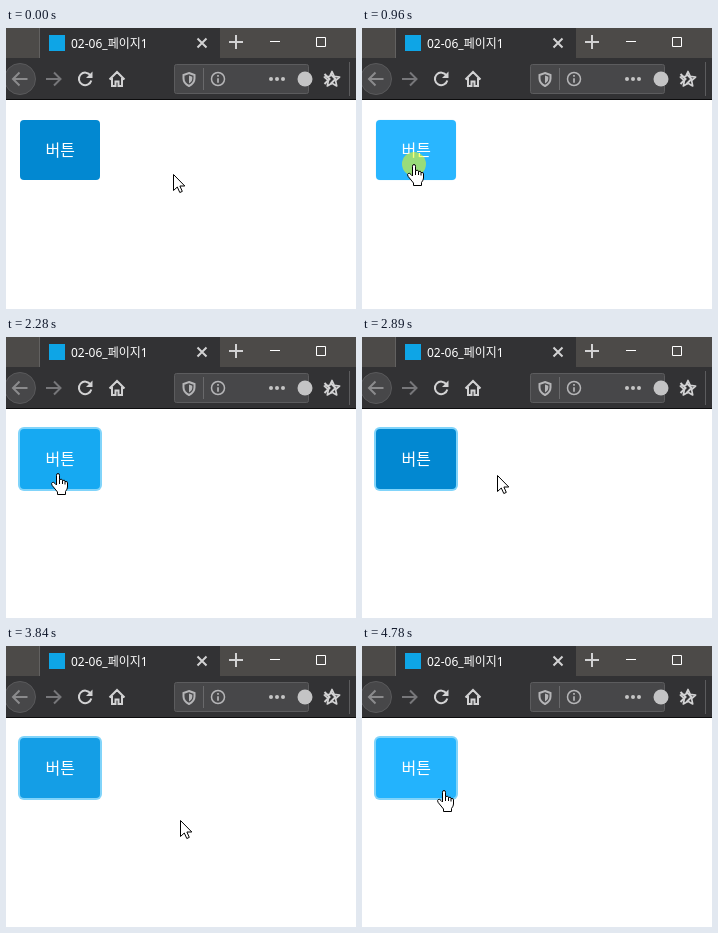
An HTML page for the animation above (5390 ms loop, 350x281 px).

```html
<!DOCTYPE html>
<html lang="ko">
<head>
<meta charset="utf-8">
<title>Button states</title>
<style>
  html, body { margin: 0; width: 100%; height: 100%; overflow: hidden; background: #fff; }
  svg { display: block; width: 100%; height: 100%; }
  text { fill: #fff; font-family: "Noto Sans", "Noto Sans CJK KR", "Noto Sans CJK", sans-serif; }
  .icon { fill: none; stroke: #d2d2d3; stroke-width: 2; }
  .dim { stroke: #77777a; }
  .cursor { fill: #fff; stroke: #000; stroke-linejoin: round; }
</style>
</head>
<body>
<svg viewBox="0 0 350 281">
  <!-- title bar and tab -->
  <rect width="350" height="31" fill="#4c4a48"/>
  <rect y="30" width="350" height="42" fill="#323234"/>
  <rect x="34" width="180" height="31" fill="#323234"/>
  <path d="M33.5 0V30" stroke="#626160"/>
  <rect y="71" width="350" height="1" fill="#0c0c0d"/>
  <rect x="43" y="7" width="16" height="16" fill="#0ea5e6"/>
  <text x="65" y="19.5" font-size="12">02-06_페이지1</text>
  <path class="icon" stroke-width="1.6" d="M191.5 10.500l9 9m0-9l-9 9"/>
  <path class="icon" d="M223 14H237M230 7V21"/>
  <path d="M264 13.500H274M310.500 9.500h9v9h-9z" fill="none" stroke="#fff"/>

  <!-- toolbar -->
  <circle cx="14" cy="51" r="15.500" fill="#474749" stroke="#59595b"/>
  <path class="icon dim" style="stroke:#8b8b8d" d="M21.500 51H7.500M13.500 44.500L7 51l6.500 6.500"/>
  <path class="icon dim" d="M40 51H54M48 44.500L54.500 51L48 57.500"/>
  <path class="icon" d="M84.500 47.500A6.300 6.300 0 1 0 85.300 52.500"/>
  <path d="M86.500 43.500V50H80z" fill="#d2d2d3"/>
  <path class="icon" d="M103.500 51.500L111 44l7.500 7.500M106 50V58H109.500V53.500H112.500V58H116V50"/>

  <!-- address field -->
  <rect x="168.500" y="36.500" width="134" height="29" rx="2" fill="#474749" stroke="#5c5c5e"/>
  <path class="icon" style="stroke:#b5b5b7" d="M183 45l5.500 2v3.500c0 3.500-2.500 6-5.500 7.500c-3-1.500-5.500-4-5.500-7.500V47z"/>
  <path d="M183 47.500l3.300 1.200v2c0 2-1.500 3.500-3.300 4.700z" fill="#b5b5b7"/>
  <path d="M197.500 40V62" stroke="#69696b"/>
  <circle class="icon" style="stroke:#b5b5b7;stroke-width:1.500" cx="212" cy="51" r="6.500"/>
  <path d="M212 47v1.700M212 50.200v4.500" stroke="#b5b5b7" stroke-width="1.700"/>
  <g fill="#c4c4c5">
    <circle cx="265" cy="51" r="2"/><circle cx="271" cy="51" r="2"/><circle cx="277" cy="51" r="2"/>
    <circle cx="299" cy="51" r="7.500"/>
  </g>
  <path id="star" class="icon" style="stroke-width:1.700;stroke-linejoin:round"/>
  <path class="icon" d="M318.500 46l5 5l-5 5M324.500 46l5 5l-5 5"/>
  <path d="M343.500 34V68" stroke="#5c5c5e"/>

  <!-- page -->
  <rect id="ring" fill="#81d4fa"/>
  <rect id="button" x="14" y="92" width="80" height="60" rx="4"/>
  <text x="54.300" y="127.500" font-size="16" text-anchor="middle">버튼</text>
  <circle id="press" r="12" fill="#ffff00" fill-opacity=".52"/>
  <path id="arrow" class="cursor" d="M.5 .5V16.500L4.300 13L6.800 18.500L9.300 17.400L6.900 12H11.800z"/>
  <g id="hand" class="cursor">
    <path d="M5.500 12V2.300Q5.500 .5 7 .5Q8.500 .5 8.500 2.300V6.500Q11.500 5.500 11.500 7.500Q14 6.500 14 8.500Q16.500 7.700 16.500 10V14Q16.500 16 14.500 18.500V21.500H6.500V19L1.200 12.500Q-.2 10.300 1.300 9.500Q2.800 8.800 4 10.500z"/>
    <path d="M8.500 6.500V11M11.500 7.500V11M14 8.500V11.500" fill="none"/>
  </g>
</svg>
<script>
const LOOP = 5390;

// The picture is refreshed only at these moments
const TICKS = [
  0, 420, 500, 580, 660, 730, 890, 970, 1040, 1120, 1190,
  2050, 2130, 2280, 2360, 2740, 2820, 2890,
  3290, 3370, 3440, 3520, 3600, 3680, 3760, 3840, 3910, 4000, 4080,
  4230, 4310, 4390, 4470, 4540, 4620, 4700, 4780
];

// time, x, y, pointer shape
const MOVES = [
  [0, 167, 146, "arrow"],
  [420, 66, 141, "hand"],
  [500, 36, 138, "hand"],
  [580, 27, 137, "hand"],
  [660, 38, 136, "hand"],
  [730, 45, 136, "hand"],
  [2740, 118, 138, "arrow"],
  [2820, 135, 138, "arrow"],
  [3290, 82, 141, "hand"],
  [3370, 79, 142, "hand"],
  [3840, 174, 174, "arrow"],
  [4230, 84, 146, "hand"],
  [4310, 75, 144, "hand"]
];

const BASE = [2, 136, 209], HOVER = [41, 182, 255], ACTIVE = [3, 155, 229];
const HALF = [20, 158, 230], REST = [35, 179, 253];

// time, button colour; blended in between
const FILLS = [
  [340, BASE], [580, HOVER],
  [890, HOVER], [1040, ACTIVE], [1190, HOVER],
  [1970, HOVER], [2130, ACTIVE], [2200, ACTIVE], [2360, HOVER],
  [2660, HOVER], [2740, HALF], [2890, BASE],
  [3210, BASE], [3440, HOVER], [3600, ACTIVE], [3760, HOVER],
  [3780, HOVER], [3840, HALF], [4080, BASE],
  [4150, BASE], [4390, HOVER], [4540, ACTIVE], [4780, REST]
];

const PRESSES = [[890, 1040], [2050, 2280], [3440, 3600], [4390, 4540]];

const el = id => document.getElementById(id);
const set = (node, attrs) => {
  for (const k in attrs) node.setAttribute(k, attrs[k]);
};
const clamp = v => Math.min(1, Math.max(0, v));

function fillAt(t) {
  const i = FILLS.findIndex(k => k[0] > t);
  if (i === 0) return FILLS[0][1];
  if (i < 0) return FILLS[FILLS.length - 1][1];
  const [t0, a] = FILLS[i - 1], [t1, b] = FILLS[i];
  const p = (t - t0) / (t1 - t0);
  return a.map((v, n) => Math.round(v + (b[n] - v) * p));
}

function draw(now) {
  const time = now % LOOP;
  const t = TICKS.filter(k => k <= time).pop();
  const [, x, y, shape] = MOVES.filter(k => k[0] <= t).pop();

  set(el("button"), { fill: `rgb(${fillAt(t)})` });

  const focus = clamp((t - 820) / 370), w = 2 * focus;
  set(el("ring"), {
    x: 14 - w, y: 92 - w, width: 80 + 2 * w, height: 60 + 2 * w,
    rx: 4 + w, opacity: focus
  });

  for (const id of ["arrow", "hand"]) {
    set(el(id), {
      transform: `translate(${x} ${y})`,
      visibility: id === shape ? "visible" : "hidden"
    });
  }

  const down = PRESSES.some(([a, b]) => t >= a && t < b);
  set(el("press"), { cx: x + 7, cy: y, visibility: down ? "visible" : "hidden" });
}

const points = Array.from({ length: 10 }, (_, i) => {
  const r = i % 2 ? 3.8 : 8, a = (i / 5 - 0.5) * Math.PI;
  return `${(326 + r * Math.cos(a)).toFixed(2)} ${(51.5 + r * Math.sin(a)).toFixed(2)}`;
});
set(el("star"), { d: `M${points.join("L")}z` });

const start = performance.now();
function tick() {
  draw(performance.now() - start);
  requestAnimationFrame(tick);
}
tick();
</script>
</body>
</html>
```
